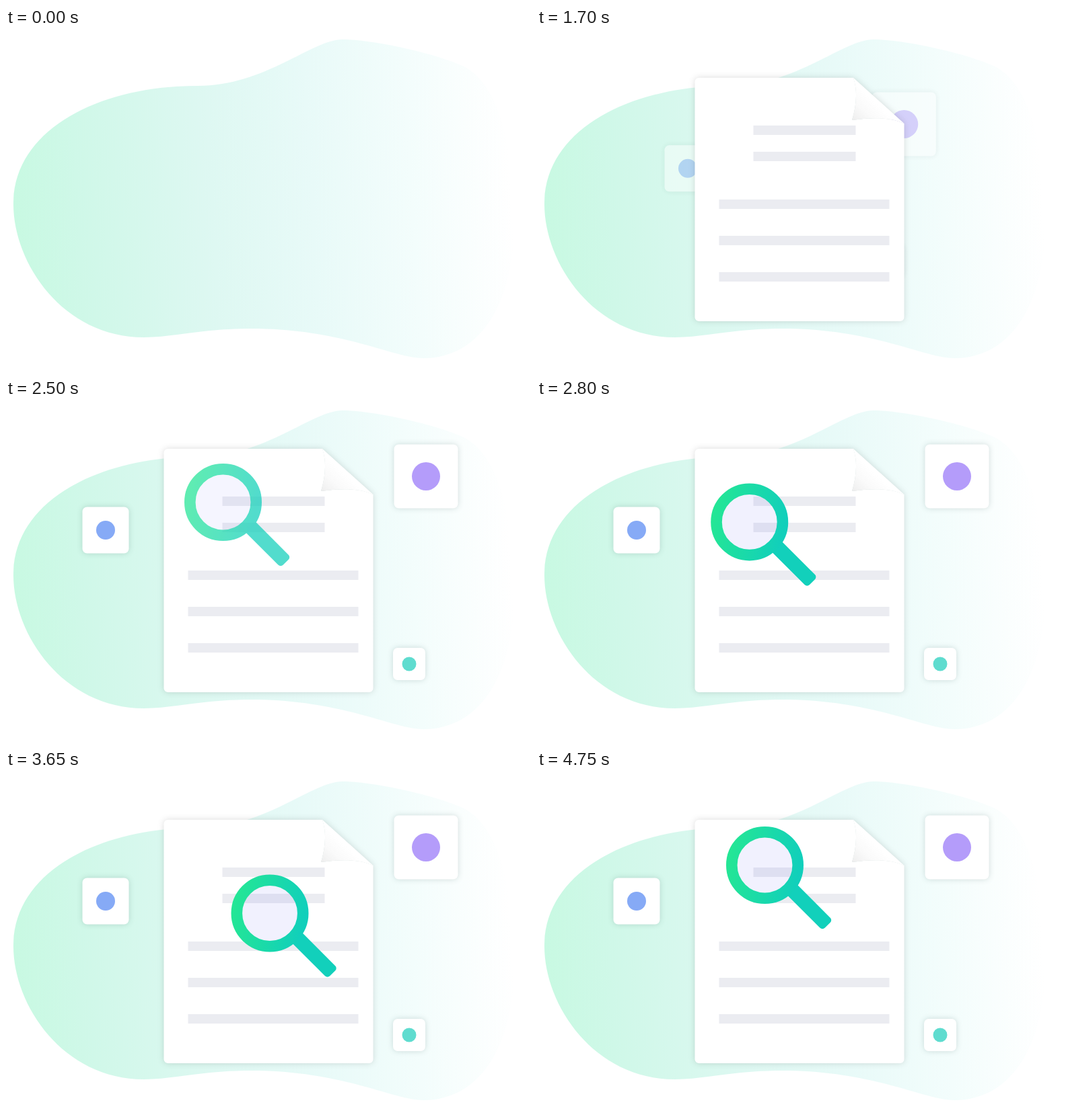
Write an HTML page that moves like this. It is 780 px wide and 510 px high and loops after 4800 ms.

```html
<!DOCTYPE html>
<html lang="en">
<head>
<meta charset="utf-8">
<title>Document search</title>
<style>
  html, body { margin: 0; width: 100%; height: 100%; overflow: hidden; background: #fff; }
  svg { display: block; width: 780px; height: 510px; }
  #page { filter: drop-shadow(0 0 5px rgba(0, 0, 0, .14)); }
  .card { filter: drop-shadow(0 0 4px rgba(0, 40, 40, .16)); }
</style>
</head>
<body>
<svg viewBox="0 0 780 510">
  <defs>
    <linearGradient id="mint" gradientUnits="userSpaceOnUse" x1="11" y1="282" x2="750" y2="238">
      <stop offset="0" stop-color="#c8f9e2"/>
      <stop offset=".13" stop-color="#cff8e8"/>
      <stop offset=".4" stop-color="#def8f2"/>
      <stop offset=".6" stop-color="#e8faf8"/>
      <stop offset=".8" stop-color="#f3fdfc"/>
      <stop offset="1" stop-color="#fff"/>
    </linearGradient>
    <linearGradient id="curl" gradientUnits="userSpaceOnUse" x1="471" y1="137" x2="499" y2="107">
      <stop offset="0" stop-color="#efefef"/>
      <stop offset=".5" stop-color="#fafafa"/>
      <stop offset="1" stop-color="#fff"/>
    </linearGradient>
    <linearGradient id="rim" gradientUnits="userSpaceOnUse" x1="-57" y1="0" x2="50" y2="20">
      <stop offset="0" stop-color="#24e695"/>
      <stop offset="1" stop-color="#11cfbb"/>
    </linearGradient>
  </defs>

  <path fill="url(#mint)" d="M11 262C11 150 140 86 285 86C385 86 455 17 500 17C545 17 640 38 680 57
    C735 84 756 190 756 285C756 400 710 491 620 491C575 491 500 447 365 447
    C290 447 250 460 205 460C85 460 11 350 11 262Z"/>

  <g id="cards"></g>

  <g id="page">
    <path fill="#fff" d="M241 74H470C477 95 474 117 468 137C495 133 525 132 545.5 142
      V430a6 6 0 0 1-6 6H240.5a6 6 0 0 1-6-6V80a6 6 0 0 1 6-6Z"/>
    <path fill="url(#curl)" d="M470 74C477 95 474 117 468 137C495 133 525 132 545.5 142Z"/>
    <path stroke="#ebecf1" stroke-width="14"
      d="M321.5 152h152m-152 39h152M270.5 262h253m-253 54h253m-253 54h253"/>
  </g>

  <g id="lens">
    <rect x="50" y="-13.5" width="79" height="21.5" rx="5" fill="#12d0bb" transform="rotate(45)"/>
    <circle r="41" fill="rgb(20,20,230)" fill-opacity=".057"/>
    <circle r="49.2" fill="none" stroke="url(#rim)" stroke-width="16.6"/>
  </g>
</svg>
<script>
const LOOP = 4800, STEP = 50, FADE = 550;
const PAGE_IN = 400, CARDS_IN = 1450, LENS_IN = 2100;

// Final place, size, disc and the offset each card starts from.
const cards = [
  { x: 113.5, y: 160.5, size: 69, r: 14, color: '#86aaf6', dx: 123.5, dy: 22.5 },
  { x: 576.5, y: 67.5, size: 95, r: 21, color: '#b49cfa', dx: -128, dy: 45.5 },
  { x: 575, y: 370, size: 48, r: 10.5, color: '#5fdccf', dx: -126, dy: -78 }
];

// Time, x, y of the lens centre on its round trip.
const route = [
  [2100, 366, 132], [2300, 341, 138.5], [2500, 322.5, 153.5], [2790, 315.6, 182],
  [3100, 329, 210], [3200, 335, 216], [3400, 361, 223], [3650, 392, 213],
  [3880, 409, 193], [4100, 411.5, 170.5], [4200, 410, 160.5], [4450, 382, 136],
  [4600, 359, 133.5], [4750, 338.5, 141.5]
];

const byId = id => document.getElementById(id);
const ramp = (t, start, length) => Math.min(1, Math.max(0, (t - start) / length));

function place(node, x, y, opacity) {
  node.setAttribute('transform', `translate(${x} ${y})`);
  node.setAttribute('opacity', opacity);
}

// Smooth curve through the route points, with slopes taken from the neighbours.
function along(points, t) {
  const last = points.length - 1;
  let i = 0;
  while (i < last - 1 && t > points[i + 1][0]) i++;
  const a = points[i], b = points[i + 1], span = b[0] - a[0];
  const u = ramp(t, a[0], span);
  const slope = (k, axis) => {
    const p = points[Math.max(0, k - 1)], q = points[Math.min(last, k + 1)];
    return (q[axis] - p[axis]) / (q[0] - p[0]) * span;
  };
  return [1, 2].map(axis =>
    a[axis] * (1 + 2 * u) * (1 - u) ** 2 + slope(i, axis) * u * (1 - u) ** 2 +
    b[axis] * u * u * (3 - 2 * u) + slope(i + 1, axis) * u * u * (u - 1));
}

byId('cards').innerHTML = cards.map(({ x, y, size, r, color }) => `
  <g class="card">
    <rect x="${x}" y="${y}" width="${size}" height="${size}" rx="7" fill="#fff"/>
    <circle cx="${x + size / 2}" cy="${y + size / 2}" r="${r}" fill="${color}"/>
  </g>`).join('');
const cardNodes = [...byId('cards').children];

function draw(t) {
  place(byId('page'), 0, -60 * (1 - ramp(t, 450, 800)), ramp(t, PAGE_IN, FADE));

  const left = 1 - ramp(t, CARDS_IN, 650);
  cards.forEach((card, i) =>
    place(cardNodes[i], card.dx * left, card.dy * left, ramp(t, CARDS_IN, FADE)));

  place(byId('lens'), ...along(route, t), ramp(t, LENS_IN, FADE));
}

const began = performance.now();
function tick() {
  const t = (performance.now() - began) % LOOP;
  draw(Math.floor(t / STEP) * STEP);
  requestAnimationFrame(tick);
}
tick();
</script>
</body>
</html>
```
